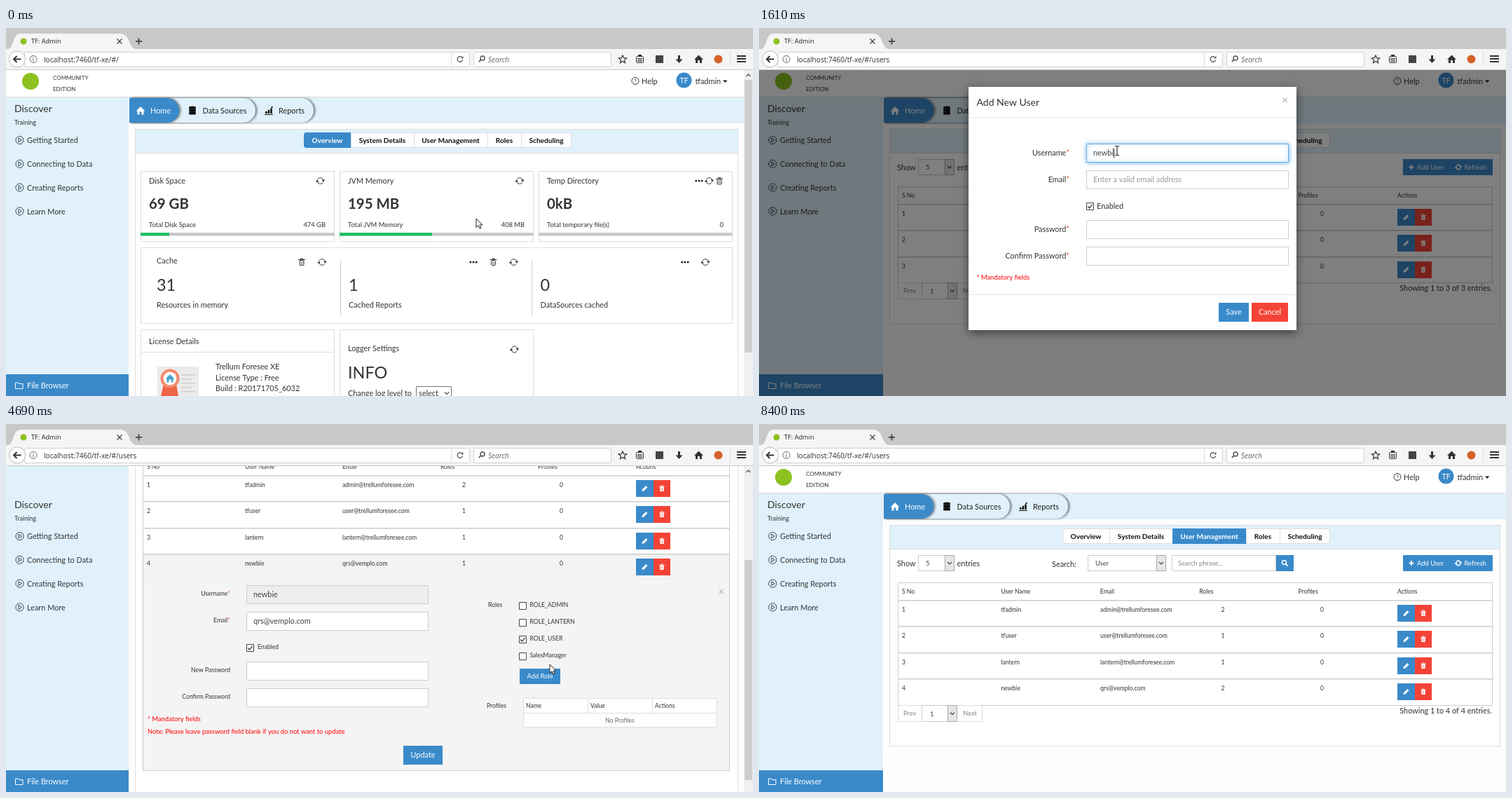
Recreate the animation shown at these times as an HTML page with a canvas. Size 1066 px wide and 525 px high, loop 8.47 s.

```html
<!DOCTYPE html>
<html lang="en">
<head>
<meta charset="utf-8">
<title>User admin walkthrough</title>
<style>
html, body { margin: 0; width: 100%; height: 100%; overflow: hidden; background: #fff; }
canvas { display: block; width: 1066px; height: 525px; }
</style>
</head>
<body>
<canvas id="stage" width="1066" height="525"></canvas>
<script>
const c = document.getElementById('stage').getContext('2d');
const LOOP = 8470, STEP = 70, W = 1066, H = 525, TOP = 60;
const BLUE = '#3a8aca', PALE = '#e0f1fb', RED = '#f44336', INK = '#333', LINE = '#ddd', GREEN = '#8cc220';
const SCROLL = 178;
const USERS = [
  ['tfadmin', 'admin@trellumforesee.com', 2],
  ['tfuser', 'user@trellumforesee.com', 1],
  ['lantern', 'lantern@trellumforesee.com', 1],
  ['newbie', 'qrs@vemplo.com', 1]
];
const ROLES = ['ROLE_ADMIN', 'ROLE_LANTERN', 'ROLE_USER', 'SalesManager', 'accountant'];
// time, x, y, pointer kind
const PATH = [
  [70, 671, 272, 'arrow'], [210, 624, 163, 'hand'], [420, 624, 163, 'hand'],
  [700, 941, 199, 'hand'], [980, 941, 199, 'hand'], [1190, 511, 174, 'beam'],
  [2450, 511, 174, 'beam'], [2520, 501, 276, 'beam'], [3570, 501, 276, 'beam'],
  [3780, 677, 405, 'hand'], [3850, 677, 405, 'hand'], [4060, 925, 380, 'hand'],
  [4200, 925, 380, 'hand'], [4690, 776, 343, 'arrow'], [4830, 769, 358, 'hand'],
  [5180, 769, 362, 'hand'], [5390, 885, 400, 'beam'], [6300, 885, 400, 'beam'],
  [6510, 948, 455, 'hand'], [6580, 948, 455, 'hand'], [6790, 738, 354, 'arrow'],
  [6860, 738, 354, 'arrow'], [7000, 828, 322, 'arrow'], [7070, 828, 322, 'arrow'],
  [7700, 597, 494, 'hand'], [8190, 597, 494, 'hand']
];

const clamp = v => Math.max(0, Math.min(1, v));
const ease = v => { v = clamp(v); return v * v * (3 - 2 * v); };

function text(s, x, y, size = 10.9, color = INK, o = {}) {
  c.font = `${o.weight || ''} ${size}px ${o.face || 'Lato'}, sans-serif`;
  c.fillStyle = color;
  c.textAlign = o.align || 'left';
  c.fillText(s, x, Math.round(y + size * .36)); // y is the middle of the capitals
  return c.measureText(s).width;
}
function box(x, y, w, h, fill, stroke, r = 0) {
  c.beginPath();
  if (stroke) c.roundRect(x + .5, y + .5, w - 1, h - 1, r);
  else c.roundRect(x, y, w, h, r);
  if (fill) { c.fillStyle = fill; c.fill(); }
  if (stroke) { c.strokeStyle = stroke; c.lineWidth = 1; c.stroke(); }
}
function poly(pts, color, w = 1, fill) {
  c.beginPath();
  for (let i = 0; i < pts.length; i += 2) c.lineTo(pts[i], pts[i + 1]);
  if (fill) { c.fillStyle = fill; c.closePath(); c.fill(); }
  if (color) { c.strokeStyle = color; c.lineWidth = w; c.stroke(); }
}
function disc(x, y, r, fill, stroke, w = 1) {
  c.beginPath();
  c.arc(x, y, r, 0, 7);
  if (fill) { c.fillStyle = fill; c.fill(); }
  if (stroke) { c.strokeStyle = stroke; c.lineWidth = w; c.stroke(); }
}
function at(x, y, fn) { c.save(); c.translate(x, y); fn(); c.restore(); }
const hline = (x, y, x2, color = LINE) => box(x, y, x2 - x, 1, color);
const vline = (x, y, y2, color = LINE) => box(x, y, 1, y2 - y, color);

const icon = {
  refresh(color = INK, r = 4.4, w = 1) {
    for (let k = 0; k < 2; k++) {
      c.rotate(Math.PI);
      c.beginPath();
      c.arc(0, 0, r, .5, 2.9);
      c.strokeStyle = color; c.lineWidth = w; c.stroke();
      poly([-r - 2.2, 1.6, -r + 2.2, 1.6, -r, -1.8], null, 0, color);
    }
  },
  trash(color = INK, solid) {
    if (solid) c.scale(.8, .8);
    box(-3.5, -3, 7, 8, solid ? color : null, solid ? null : color, 1);
    poly([-5, -3.5, 5, -3.5], color, 1);
    poly([-1.5, -4, -1.5, -5.2, 1.5, -5.2, 1.5, -4], color);
    for (const x of [-1, 1]) poly([x, -1, x, 3.5], solid ? RED : color, .7);
  },
  dots() { for (const x of [-4.2, 0, 4.2]) disc(x, 0, 1.5, '#222'); },
  home(color) { poly([-6.5, .5, 0, -6, 6.5, .5, 4.5, .5, 4.5, 5.5, 1.5, 5.5, 1.5, 1.5, -1.5, 1.5, -1.5, 5.5, -4.5, 5.5, -4.5, .5], null, 0, color); },
  data() {
    for (const y of [-5, -1.2, 2.6]) {
      c.beginPath(); c.ellipse(0, y, 5, 1.6, 0, 0, 7); c.fillStyle = '#111'; c.fill();
      box(-5, y + .4, 10, 2.4, '#111', null, 1);
    }
  },
  chart() {
    for (let i = 0; i < 3; i++) box(-5 + i * 3.6, 1 - i * 2.2, 2.6, 3 + i * 2.2, '#111');
    poly([-6, 5.5, 6, 5.5], '#111', 1);
    disc(4.5, -5, 1.2, '#111');
  },
  play() { disc(0, 0, 5.6, null, '#345'); poly([-1.6, -3, 3, 0, -1.6, 3, -1.6, -3], '#345', 1); },
  pencil() { poly([-4, 4, -3.4, 1.2, 1.8, -4, 4, -1.8, -1.2, 3.4], null, 0, '#fff'); },
  down(color = '#444') { poly([-3, -1.5, 0, 1.5, 3, -1.5], color, 1.2); },
  cross(color = '#444', r = 3.5) { poly([-r, -r, r, r], color, 1.2); poly([r, -r, -r, r], color, 1.2); },
  plus(color, r = 3.5) { poly([-r, 0, r, 0], color, 1.8); poly([0, -r, 0, r], color, 1.8); },
  lens(color) { disc(-1, -1, 3, null, color, 1.5); poly([1.2, 1.2, 4.2, 4.2], color, 1.8); }
};
const put = (name, x, y, ...args) => at(x, y, () => icon[name](...args));

function button(s, x, y, w, h, fill = BLUE, size = 10.9) {
  box(x, y, w, h, fill);
  text(s, x + w / 2, y + h / 2, size, '#fff', { align: 'center' });
}
function select(x, y, w, h, s, tx) {
  box(x, y, w, h, '#fff', '#ccc');
  box(x + w - 14, y, 14, h, '#e6e6e6', '#aaa');
  put('down', x + w - 7, y + h / 2);
  text(s, tx, y + h / 2 + .5, 9.4, '#444');
}
function check(x, y, on) {
  box(x, y, 11, 11, '#fff', '#444');
  if (on) poly([x + 2.3, y + 5.5, x + 4.5, y + 8, x + 8.8, y + 2.8], '#333', 1.2);
}
function label(s, right, y, size = 10.9, star = true) {
  if (star) text('*', right, y, size, RED, { align: 'right' });
  const gap = star ? c.measureText('*').width : 0;
  text(s, right - gap, y, size, INK, { align: 'right' });
}
function field(x, y, w, h, value, o = {}) {
  c.save();
  if (o.focus) { c.shadowColor = o.focus; c.shadowBlur = 6; }
  box(x, y, w, h, o.fill || '#fff', o.focus || '#ccc');
  c.restore();
  const mid = y + h / 2;
  let end = x + 10;
  if (o.dots) {
    for (let i = 0; i < value; i++) disc(x + 13.2 + i * 6.28, mid + .5, 2.5, '#333');
    end += value * 6.25;
  } else if (value) end += text(value, x + 10, mid, 10.9, '#444');
  else if (o.hint) text(o.hint, x + 10, mid, 10.9, '#999');
  if (o.focus) vline(Math.round(end), mid - 7, mid + 7, '#222');
}

function browser(users) {
  const ui = { face: '"Open Sans"' };
  box(0, 0, W, TOP, '#c8c8c8');
  box(0, 30, W, 30, '#f5f5f5');
  c.beginPath();
  c.moveTo(0, 31);
  c.bezierCurveTo(13, 31, 8, 8, 21, 8);
  c.lineTo(162, 8);
  c.bezierCurveTo(180, 8, 172, 31, 190, 31);
  c.fillStyle = '#f5f5f5';
  c.fill();
  hline(0, 59, W, '#ccc');
  disc(25, 19, 4.5, GREEN);
  text('TF: Admin', 36, 19, 9.2, '#222', ui);
  put('cross', 162, 19);
  put('plus', 189.5, 19, '#444', 4.5);
  box(26, 34, 636, 22, '#fff', '#d0d0d0', 2);
  disc(16, 44.5, 11.5, '#fff', '#bbb');
  poly([21.5, 44.5, 11.5, 44.5], '#333', 2);
  poly([15.5, 40, 11, 44.5, 15.5, 49], '#333', 2);
  disc(39, 44.5, 5, null, '#666');
  box(38.5, 43.5, 1, 4, '#555'); box(38.5, 41.5, 1, 1, '#555');
  text('localhost:7460/tf-xe/#/' + (users ? 'users' : ''), 54, 45, 10.1, '#333', ui);
  vline(635, 36, 54, '#ddd');
  c.beginPath(); c.arc(648, 44.5, 3.8, .3, 5.4); c.strokeStyle = '#555'; c.lineWidth = 1.3; c.stroke();
  poly([649, 43.5, 652.5, 43.5, 652.5, 40], null, 0, '#555');
  box(667, 34, 197, 22, '#fff', '#d0d0d0', 2);
  at(679, 44, () => { c.scale(-1, 1); icon.lens('#555'); });
  text('Search', 688, 45, 10.1, '#666', { ...ui, weight: 'italic' });
  const star = [];
  for (let i = 0; i <= 10; i++) {
    const r = i % 2 ? 2.7 : 6, a = i * Math.PI / 5 - Math.PI / 2;
    star.push(880 + r * Math.cos(a), 44.8 + r * Math.sin(a));
  }
  poly(star, '#333', 1.2);
  box(899, 40, 11, 10, null, '#333', 1);
  box(902, 38, 5, 3, '#333');
  for (const y of [43, 45, 47]) hline(901, y, 908, '#333');
  box(927, 39, 11, 11, '#444');
  poly([960.5, 39, 960.5, 46], '#333', 3);
  poly([955.5, 44.5, 965.5, 44.5, 960.5, 50], null, 0, '#333');
  put('home', 988.5, 44.5, '#333');
  disc(1016.5, 44.5, 6, '#d4622a');
  vline(1033, 34, 55, '#ddd');
  for (const y of [39, 43, 47]) box(1043, y, 13, 2, '#333');
}

function header(right, left) {
  box(0, TOP, right, 38, '#fff');
  hline(0, 98, right, '#ddd');
  disc(35, 76, 12, GREEN);
  text('COMMUNITY', 67, 71.5, 8);
  text('EDITION', 67, 87, 8);
  const x = right - 1053;
  disc(898 + x, 75.5, 5, null, '#333');
  text('?', 898 + x, 75.8, 8, INK, { align: 'center' });
  text('Help', 907 + x, 76);
  disc(967.5 + x, 74.5, 11, BLUE);
  text('TF', 967.5 + x, 75, 10.5, '#fff', { align: 'center' });
  text('tfadmin', 983.5 + x, 76);
  poly([1023 + x, 74.5, 1029.5 + x, 74.5, 1026.2 + x, 78], null, 0, '#222');

  box(left, 99, right - left, 37, PALE);
  for (const [w, fill] of [[263, PALE], [180, PALE], [71, BLUE]]) {
    c.save();
    c.shadowColor = 'rgba(0,0,0,.45)'; c.shadowBlur = 3; c.shadowOffsetX = 2.5;
    c.beginPath(); c.roundRect(left, 100, w, 35, [0, 18, 18, 0]);
    c.fillStyle = fill; c.fill();
    c.restore();
  }
  put('home', left + 16, 118, '#fff');
  text('Home', left + 30, 118.5, 10.9, '#fff');
  put('data', left + 90, 118);
  text('Data Sources', left + 104.5, 118.5, 10.9, '#222');
  put('chart', left + 199, 118);
  text('Reports', left + 213, 118.5, 10.9, '#222');
}

function tabs(dx, active) {
  const names = ['Overview', 'System Details', 'User Management', 'Roles', 'Scheduling'];
  const edges = [425, 492, 582, 687, 735, 807];
  box(425 + dx, 149, 382, 22, '#fff', LINE, 4);
  names.forEach((s, i) => {
    const x = edges[i] + dx, w = edges[i + 1] - edges[i];
    if (i === active) box(x, 149, w, 22, BLUE, null, i ? 0 : [4, 0, 0, 4]);
    else if (i) vline(x, 150, 170);
    text(s, x + w / 2, 160, 10.1, i === active ? '#fff' : '#111', { weight: 'bold', align: 'center' });
  });
}

function sidebar(w, y) {
  box(0, y, w, H - y, PALE);
  text('Discover', 12, 115, 14);
  text('Training', 12, 135, 9);
  ['Getting Started', 'Connecting to Data', 'Creating Reports', 'Learn More'].forEach((s, i) => {
    const row = 160.5 + i * 33.8;
    put('play', 19.5, row - .5);
    text(s, 30, row);
  });
  box(0, 494, w, 31, BLUE);
  poly([13.5, 514.5, 13.5, 506, 17.5, 506, 18.5, 507.5, 24, 507.5, 24, 514.5, 13.5, 514.5], '#fff');
  text('File Browser', 30, 510.5, 10.9, '#fff');
}

function scrollbar(scroll, height) {
  const k = 437 / height;
  box(1053, TOP, 13, H - TOP, '#f0f0f0');
  box(1054, Math.round(74 + scroll * k), 11, Math.round(465 * k), '#cdcdcd');
  poly([1056.5, 69, 1059.5, 66, 1062.5, 69], '#555', 1.3);
}

function dashboard() {
  box(184, 144, 861, 400, '#fff', LINE);
  box(185, 145, 859, 33, PALE);
  hline(184, 178, 1045);
  tabs(0, 0);
  const cards = [
    [192, 'Disk Space', '69 GB', 'Total Disk Space', '474 GB', 41],
    [476, 'JVM Memory', '195 MB', 'Total JVM Memory', '408 MB', 132],
    [760, 'Temp Directory', '0kB', 'Total temporary file(s)', '0', 0]
  ];
  for (const [x, name, value, total, max, used] of cards) {
    box(x, 204, 277, 101, '#fff', LINE);
    text(name, x + 12, 218.5);
    text(value, x + 12, 251, 20.4, INK, { weight: 'bold' });
    text(total, x + 12, 280.5, 9.4);
    text(max, x + 264, 280.5, 9.4, INK, { align: 'right' });
    box(x, 292, 277, 4.5, '#c8c8c8');
    box(x, 292, used, 4.5, '#1dbf62');
  }
  put('refresh', 448.5, 218); put('refresh', 733, 218); put('refresh', 1003.5, 218);
  put('dots', 989, 218); put('trash', 1018, 218.5);
  box(192, 313, 845, 109, '#fff', LINE);
  vline(477, 331, 410, '#ccc'); vline(750, 331, 410, '#ccc');
  text('Cache', 215, 332);
  [[215, '31', 'Resources in memory'], [489, '1', 'Cached Reports'], [762.5, '0', 'DataSources cached']]
    .forEach(([x, n, s]) => { text(n, x, 367, 23.4); text(s, x, 395); });
  put('trash', 422, 334); put('refresh', 451, 334);
  put('dots', 667, 334); put('trash', 695.5, 334); put('refresh', 724.5, 334);
  put('dots', 969, 334); put('refresh', 998, 334);

  box(192, 430, 277, 120, '#fff', LINE);
  hline(192, 462, 468);
  text('License Details', 204, 447.5);
  box(216, 483, 59, 50, '#ebebeb');
  for (let i = 0; i < 5; i++) box(250, 494 + i * 6, i % 2 ? 14 : 20, 1.5, '#cfcfcf');
  poly([225, 508, 221, 525, 246, 525, 243, 508], null, 0, '#f0654a');
  disc(234, 500, 13.5, '#f5896a'); disc(234, 500, 9.5, '#fff');
  put('home', 234, 500, '#4aa3d0');
  ['Trellum Foresee XE', 'License Type : Free', 'Build : R20171705_6032']
    .forEach((s, i) => text(s, 299, 483.5 + i * 15.5));
  box(476, 430, 277, 120, '#fff', LINE);
  text('Logger Settings', 488, 457);
  put('refresh', 725.5, 458.5);
  text('INFO', 488, 492, 23.4);
  text('Change log level to', 488, 521);
  box(585, 511, 51, 22, '#fff', '#777');
  text('select', 589, 521);
  put('down', 629, 521);
}

function userPage(t, edit) {
  const count = t < 3850 ? 3 : 4;
  const X = x => edit ? Math.round(195 + (x - 198) * .9873) : x;
  const rowY = i => Math.floor(251 + i * 37.5);
  const bottom = rowY(count);
  const end = edit ? 880 : bottom + 59;
  const px = edit ? 184 : 186, pw = edit ? 861 : 872;
  box(px, 144, pw, end - 144, '#fff', LINE);
  box(px + 1, 145, pw - 2, 33, PALE);
  hline(px, 178, px + pw);
  tabs(edit ? 1 : 8, 2);

  text('Show', X(197), 199);
  select(X(227), 187, 52, 23, '5', X(238));
  text('entries', X(282.5), 199);
  text('Search:', X(418), 200.5);
  select(X(469), 187, 112, 23, 'User', X(480));
  box(X(589), 187, 149, 23, '#fff', '#ccc');
  text('Search phrase...', X(598), 199, 9.4, '#888');
  box(X(738), 187, 25, 23, BLUE);
  put('lens', X(750.5), 198.5, '#fff');
  const hover = t >= 700 && t < 980, ink = hover ? BLUE : '#fff';
  box(X(919), 187, 67, 23, hover ? '#fff' : BLUE, BLUE);
  box(X(986), 187, 61, 23, BLUE);
  put('plus', X(931), 198.5, ink);
  text('Add User', X(939), 199, 9.4, ink);
  put('refresh', X(998), 198.5, '#fff', 3.2, 1.5);
  text('Refresh', X(1006.5), 199, 9.4, '#fff');

  const x1 = X(198), x2 = X(1047);
  box(x1, 226, x2 - x1, bottom - 225, '#fff', '#ccc');
  ['S No', 'User Name', 'Email', 'Roles', 'Profiles', 'Actions']
    .forEach((s, i) => text(s, X(204 + i * 141.4), 239, 8.6));
  const over = t >= 3990 && t < 4200;
  for (let i = 0; i < count; i++) {
    const y = rowY(i), mid = y + 13.5, [name, mail, roles] = USERS[i];
    if (i === 3 && (over || edit)) box(x1 + 1, y, x2 - x1 - 2, 37, '#f3f3f3');
    box(x1, y, x2 - x1, 1.5, '#ccc');
    text(i + 1, X(204), mid, 8.6);
    text(name, X(345.5), mid, 8.6);
    text(mail, X(487), mid, 8.6);
    text(i === 3 && t >= 8120 ? 2 : roles, X(659.5), mid, 8.6);
    text('0', X(801), mid, 8.6);
    const bx = X(911);
    box(bx, y + 7, 25, 24, i === 3 && over ? '#1f4e79' : BLUE);
    box(bx + 25, y + 7, 24, 24, RED);
    put('pencil', bx + 12.5, y + 19);
    put('trash', bx + 37, y + 19, '#fff', true);
  }
  if (edit) return editPanel(t);
  hline(x1, bottom, x2, '#ccc');
  box(198, bottom, 121, 24, '#fff', LINE);
  text('Prev', 206, bottom + 12, 9.4, '#888');
  select(232, bottom, 51, 24, '1', 244);
  text('Next', 291, bottom + 12, 9.4, '#888');
  text(`Showing 1 to ${count} of ${count} entries.`, 1046, bottom + 8.5, 10.9, INK, { align: 'right' });
  if (over) {
    box(905, 353, 38, 18, '#222', null, 3);
    poly([920, 371, 928, 371, 924, 375], null, 0, '#222');
    text('Edit User', 924, 362, 8, '#fff', { align: 'center' });
  }
  if (t >= 490 && t < 910) {
    c.globalAlpha = (910 - t) / 2400;
    ['Error: TypeError: o.delete is not a function',
      'url: localhost:7460/tf-xe/js/user_admin.js, line: 1, column: 409',
      '(TypeError: o.delete is not a function)'].forEach((s, i) => text(s, 708, 413 + i * 15.5, 9.4));
    c.globalAlpha = 1;
  }
}

const formOpen = t => t >= 4970 && t < 6580;
const roleCount = t => t >= 6580 ? 5 : 4;
const profileY = t => 330 + (roleCount(t) - 4) * 24 + (formOpen(t) ? 172 : 72);

function editPanel(t) {
  const py = profileY(t);
  c.save();
  c.translate(0, SCROLL);
  box(195, 222, 838, py + 92 - 222, '#f4f4f4');
  vline(195, 185, py + 92, '#ccc'); vline(1032, 185, py + 92, '#ccc');
  put('cross', 1021, 239, '#bbb', 3);
  label('Username', 320, 241.5, 8.6);
  field(343, 230, 260, 27, 'newbie', { fill: '#eee' });
  label('Email', 320, 280, 8.6);
  field(343, 268, 260, 27, 'qrs@vemplo.com');
  check(343, 314, true);
  text('Enabled', 359, 318, 8.6);
  label('New Password', 320, 351, 8.6, false);
  field(343, 339, 260, 27);
  label('Confirm Password', 320, 389, 8.6, false);
  field(343, 377, 260, 27);
  text('* Mandatory fields', 202, 420.5, 9.4, '#f00');
  text('Note: Please leave password field blank if you do not want to update', 202, 438.5, 9.4, '#f00');

  text('Roles', 688, 258, 8.6);
  const n = roleCount(t);
  for (let i = 0; i < n; i++) {
    check(732, 254 + i * 24, i === 2 || i === 4 && t >= 6860);
    text(ROLES[i], 747.5, 258 + i * 23.9, 8.6);
  }
  if (formOpen(t)) {
    text('New Role', 732, 370, 14);
    label('Name', 814, 397, 8.6);
    const typed = 'accountant'.slice(0, Math.max(0, (t - 5600) / STEP));
    field(837, 385, 189, 27, typed, { focus: t >= 5460 && '#66afe9' });
    text('* Mandatory fields', 732, 428.5, 9.4, '#f00');
    button('Save', 929, 441, 43, 27);
    button('Cancel', 972, 441, 52, 27, RED);
  } else button('Add Role', 733, 349 + (n - 4) * 24, 58, 22, BLUE, 9.4);
  text('Profiles', 686, py, 8.6);
  box(738, py - 11, 277, 42, '#fff', LINE);
  hline(738, py + 10, 1014);
  vline(830, py - 11, py + 10); vline(922, py - 11, py + 10);
  ['Name', 'Value', 'Actions'].forEach((s, i) => text(s, 742 + i * 92, py, 8.6));
  text('No Profiles', 876, py + 20.5, 8.6, '#666', { align: 'center' });
  button('Update', 567, py + 57, 56, 27, t >= 7700 ? '#2b6ea6' : BLUE);
  hline(195, py + 92, 1033, '#ccc');
  c.restore();
}

function modal(t) {
  const shown = t < 3850 ? ease((t - 840) / 280) : .4;
  c.fillStyle = `rgba(0,0,0,${t < 3850 ? .5 * clamp((t - 840) / 140) : .25})`;
  c.fillRect(0, TOP, W, H - TOP);
  c.save();
  c.globalAlpha = shown;
  c.translate(0, -60 * (1 - shown));
  c.save();
  c.shadowColor = 'rgba(0,0,0,.5)'; c.shadowBlur = 12; c.shadowOffsetY = 4;
  box(299, 84, 468, 347, '#fff');
  c.restore();
  text('Add New User', 310.5, 106, 14);
  put('cross', 750.5, 103, '#bbb', 3);
  hline(299, 127, 767, '#e5e5e5');
  hline(299, 380, 767, '#e5e5e5');
  const blue = '#66afe9', dark = '#66667c';
  const name = 'newbie'.slice(0, Math.max(0, (t - 1260) / STEP));
  const chars = t <= 2100 ? 2 * (t - 1750) / STEP : 10 + (t - 2100) / STEP;
  const mail = 'qrs@vemplo.com'.slice(0, Math.max(0, chars));
  const dots = t0 => Math.max(0, Math.min(12, 2 * (t - t0) / STEP));
  const pass = dots(t < 2870 ? 2520 : 2590), again = dots(3080);
  label('Username', 443, 178);
  field(467, 165, 289, 27, name, { focus: t >= 1260 && t < 1750 && blue });
  label('Email', 443, 216.5);
  field(467, 203, 289, 27, mail, { hint: 'Enter a valid email address', focus: t >= 1750 && t < 2520 && blue });
  check(467, 249, true);
  text('Enabled', 482, 254.5);
  label('Password', 443, 287.5);
  field(467, 274, 289, 27, pass, { dots: true, focus: t >= 2520 && t < 3080 && dark });
  label('Confirm Password', 443, 325.5);
  field(467, 312, 289, 27, again, { dots: true, focus: t >= 3080 && t < 3780 && dark });
  text('* Mandatory fields', 310.5, 356, 9.4, '#f00');
  button('Save', 656, 392, 43, 27, t >= 3780 ? '#2b6ea6' : BLUE);
  button('Cancel', 703, 392, 52, 27, RED);
  c.restore();
}

const pointer = {
  arrow() { poly([0, 0, 0, 12.5, 3, 9.8, 5, 14.2, 7, 13.3, 5, 9, 9, 9, 0, 0], '#222', 1, '#fff'); },
  beam() {
    poly([0, -5, 0, 7], '#333', 1.2);
    for (const y of [-5.5, 7.5]) poly([-3, y, 3, y], '#333', 1);
  },
  hand() {
    const p = new Path2D('M-1.7 1Q0-1.5 1.7 1V6Q5 5 8 8V12L6 17H-1.5L-5 11Q-5 8-1.7 10.5Z');
    c.fillStyle = '#fff'; c.fill(p);
    c.strokeStyle = '#111'; c.lineWidth = 1.2; c.stroke(p);
    for (const x of [1.7, 4]) poly([x, 6, x, 9], '#111', .8);
  }
};
function cursor(t) {
  if (t >= 8190) return;
  let i = PATH.findIndex(k => k[0] > t);
  if (i < 1) i = 1;
  const a = PATH[i - 1], b = PATH[i];
  const p = ease((t - a[0]) / (b[0] - a[0]));
  const still = p === 0 || a[3] === b[3] && a[1] === b[1];
  at(a[1] + (b[1] - a[1]) * p, a[2] + (b[2] - a[2]) * p, pointer[still ? a[3] : 'arrow']);
}

function draw(t) {
  const users = t >= 350, edit = t >= 4200 && t < 8120;
  const bar = !users || edit;
  const right = bar ? 1053 : W, side = bar ? 175 : 177;
  const scroll = edit ? Math.round(SCROLL * ease((t - 4270) / 420)) : 0;
  box(0, 0, W, H, '#fdfdfd');
  c.save();
  c.translate(0, -scroll);
  header(right, side + 1);
  if (users) userPage(t, edit);
  else dashboard();
  c.restore();
  sidebar(side, Math.max(TOP, 99 - scroll));
  if (bar) scrollbar(scroll, edit ? profileY(t) + SCROLL + 67 : 522);
  if (t >= 910 && t < 3920) modal(t);
  browser(users);
  cursor(t);
}

const start = performance.now();
function tick() {
  const ms = (performance.now() - start) % LOOP;
  draw(Math.floor(ms / STEP) * STEP);
  requestAnimationFrame(tick);
}
tick();
</script>
</body>
</html>
```
